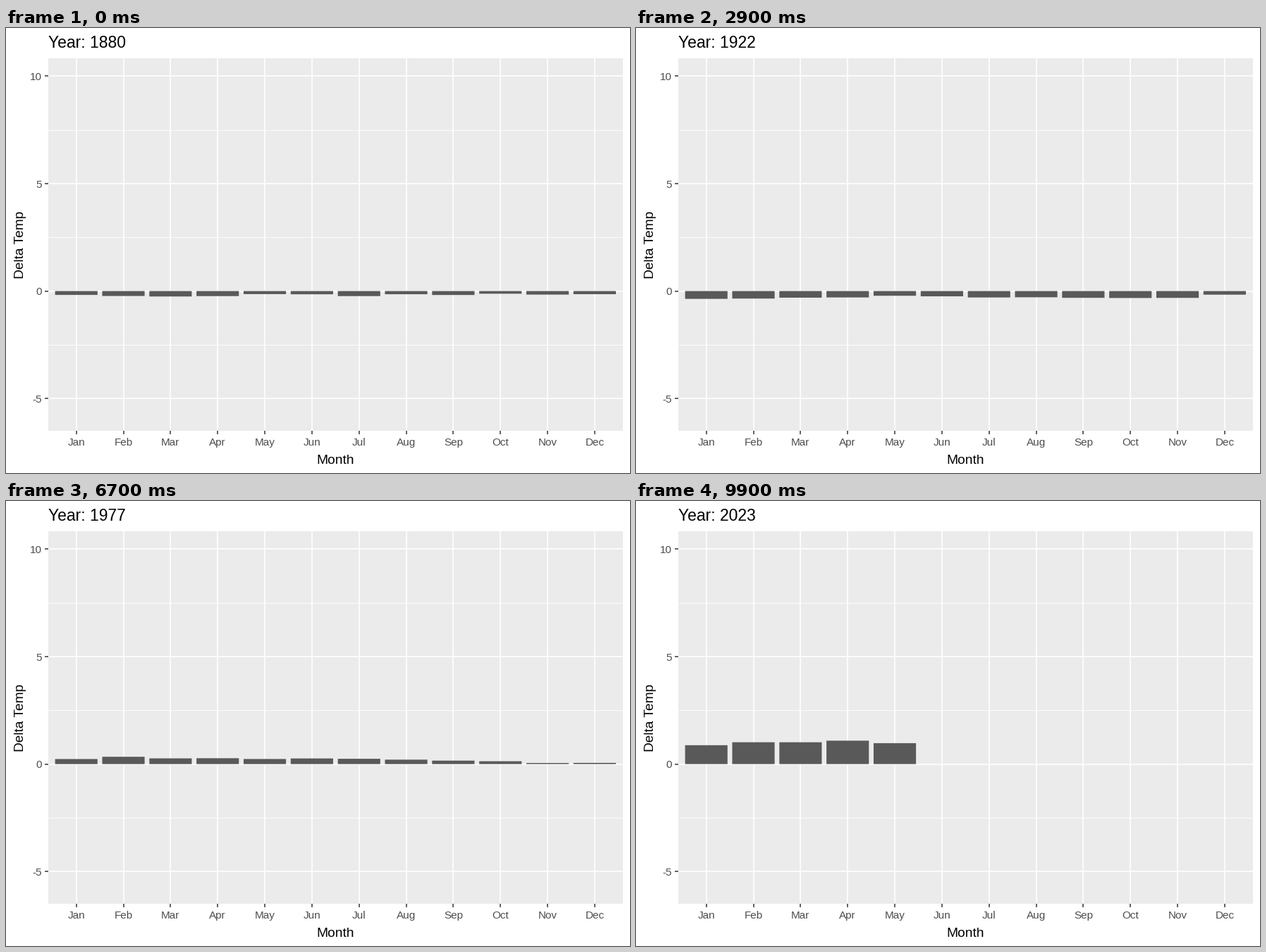
A matplotlib script that plays this animation: 885 px wide and 632 px high, repeating every 10000 ms.

```python
import numpy as np
import matplotlib.pyplot as plt
from matplotlib.animation import FuncAnimation
from matplotlib.patches import Rectangle

W, H, DPI = 885, 632, 100
FRAMES, FIRST, LAST = 100, 1880, 2023
LAST_MONTHS = 5                    # the final year is incomplete
LEFT, RIGHT, TOP, BOTTOM = 59.6, 875, 43.3, 571.6
ZERO, UNIT = 373.6, 30.53          # pixel row of 0 and pixels per degree
STEP = (RIGHT - LEFT) / 12.2
BAR = 0.9 * STEP
MONTHS = "Jan Feb Mar Apr May Jun Jul Aug Sep Oct Nov Dec".split()

# Key points of the temperature curve: (time in years, delta)
CURVE = [(1880, -.17), (1888, -.25), (1893, -.78), (1894, -.3), (1896, -.26),
         (1897, .03), (1905, -.4), (1911, -.45), (1915, -.15), (1917.9, -.7),
         (1922, -.3), (1935, -.15), (1943, .03), (1944, .25), (1950, -.17),
         (1976, -.1), (1977, .25), (1977.4, .29), (1978, .02), (1990, .4),
         (1993, .2), (2004, .7), (2004.5, .34), (2005, .65), (2012, .65),
         (2016.2, 1.25), (2018, .85), (2023, .85), (2023.2, 1.12),
         (2023.4, .95)]


def x_of(month):
    return LEFT + (0.6 + month) * STEP


def y_of(value):
    return ZERO - UNIT * value


def monthly(year):
    """Twelve temperature deltas: the curve plus a little weather."""
    months = np.arange(12)
    vals = np.interp(year + months / 12, *zip(*CURVE))
    vals += np.random.default_rng(year).normal(0, 0.045, 12)
    if year == LAST:
        vals[LAST_MONTHS:] = 0
    return vals


# Each year falls on its nearest frame; the earliest one there is drawn
rate = (FRAMES - 1) / (LAST - FIRST)
shown = {}
for yr in range(FIRST, LAST + 1):
    shown.setdefault(round((yr - FIRST) * rate), yr)

plt.rcParams["font.family"] = "Liberation Sans"
fig = plt.figure(figsize=(W / DPI, H / DPI), dpi=DPI, facecolor="white")
ax = fig.add_axes([0, 0, 1, 1])
ax.set(xlim=(0, W), ylim=(H, 0))
ax.axis("off")


def line(xs, ys, color, px, z):
    ax.plot(xs, ys, color=color, lw=px * 72 / DPI, zorder=z,
            solid_capstyle="butt")


def label(x, y, s, px, color="black", **kw):
    return ax.text(x, y, s, fontsize=px * 72 / DPI, color=color,
                   va="baseline", **kw)


ax.add_patch(Rectangle((LEFT, TOP), RIGHT - LEFT, BOTTOM - TOP,
                       fc="#EBEBEB", lw=0, zorder=0))
for v in (-2.5, 2.5, 7.5):
    line([LEFT, RIGHT], [y_of(v)] * 2, "white", 0.9, 1)
for v in (-5, 0, 5, 10):
    y = y_of(v)
    line([LEFT, RIGHT], [y, y], "white", 1.6, 2)
    line([LEFT - 5, LEFT], [y, y], "#333333", 1.5, 2)
    label(50.5, y + 5.6, str(v), 15.2, "#4D4D4D", ha="right")
for m, name in enumerate(MONTHS):
    x = x_of(m)
    line([x, x], [TOP, BOTTOM], "white", 1.6, 2)
    line([x, x], [BOTTOM, BOTTOM + 5], "#333333", 1.5, 2)
    label(x, 593, name, 15.2, "#4D4D4D", ha="center")

label((LEFT + RIGHT) / 2, 619, "Month", 19.1, ha="center")
label(25.5, (TOP + BOTTOM) / 2, "Delta Temp", 19.1, ha="center",
      rotation=90, rotation_mode="anchor")
title = label(LEFT, 28.3, "", 22.9, ha="left")

bars = [ax.add_patch(Rectangle((x_of(m) - BAR / 2, ZERO), BAR, 0,
                               fc="#595959", lw=0, zorder=3, snap=False))
        for m in range(12)]


def update(i):
    title.set_text(f"Year: {round(FIRST + i / rate)}")
    for bar, v in zip(bars, monthly(shown[i])):
        bar.set_height(-UNIT * v)
    return [title, *bars]


anim = FuncAnimation(fig, update, frames=FRAMES, interval=100,
                     repeat=True, repeat_delay=0, blit=False)
plt.show()
```
